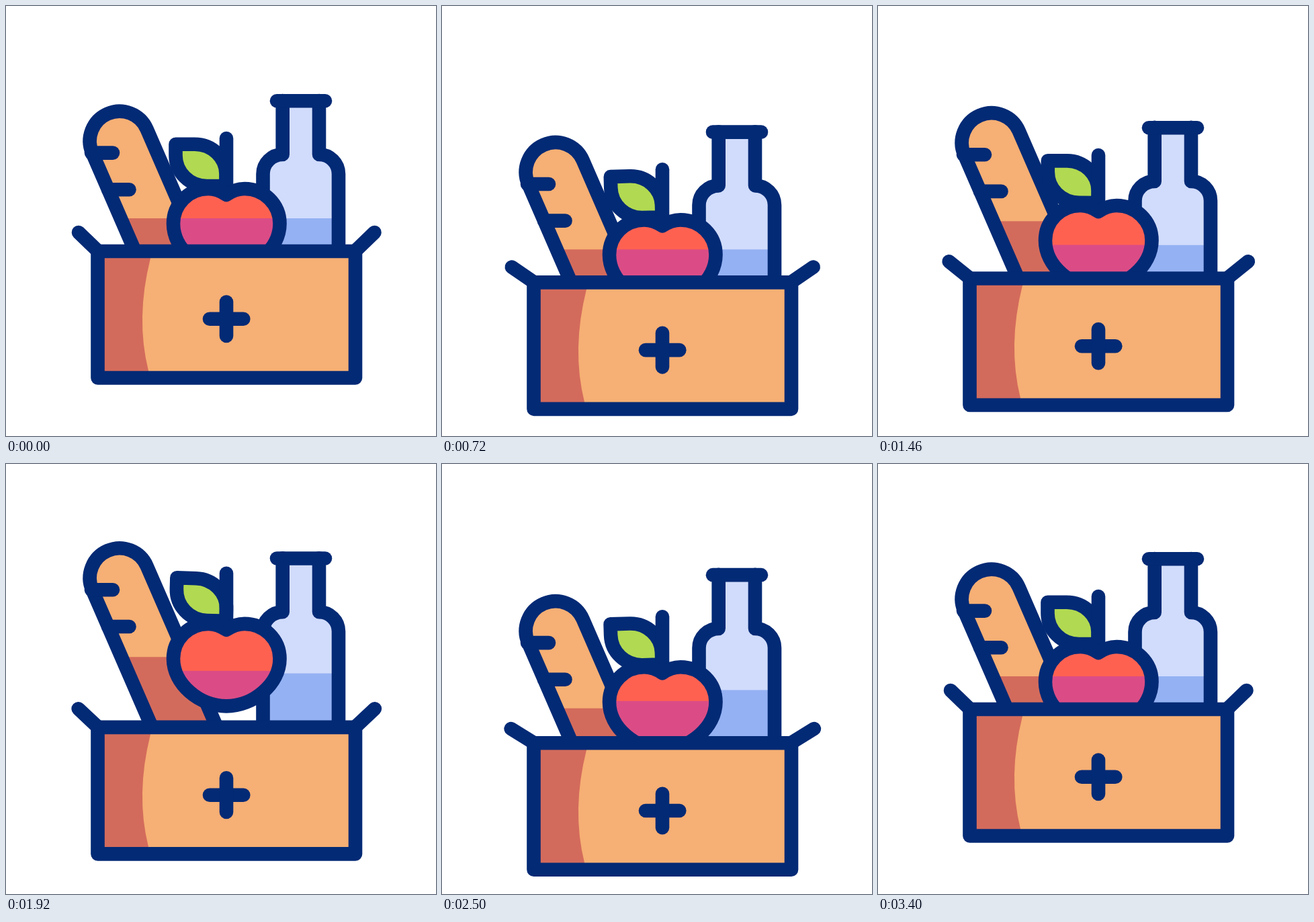
Animation of 640 by 640 pixels, one loop 3.62 s. Source, as an HTML page with a canvas:

```html
<!DOCTYPE html>
<html lang="en">
<head>
<meta charset="utf-8">
<title>Food box</title>
<style>
  html, body { margin: 0; width: 100%; height: 100%; overflow: hidden; background: #fff; }
  canvas { display: block; width: 100vw; height: 100vh; }
</style>
</head>
<body>
<canvas id="stage" width="640" height="640"></canvas>
<script>
const ctx = document.getElementById('stage').getContext('2d');
const LOOP = 3620, STEP = 20, LINE = 20.6, MID = 328.25;
const C = {
  ink: '#032a75', crust: '#f6af74', brown: '#d36b5c', red: '#ff6151', pink: '#db4c86',
  green: '#b1d951', glass: '#d1dcfc', water: '#94b1f3'
};

// Value at time t along [time, value] keys, eased in and out.
function track(t, keys) {
  if (t <= keys[0][0]) return keys[0][1];
  for (let i = 1; i < keys.length; i++) {
    const [t0, v0] = keys[i - 1], [t1, v1] = keys[i];
    if (t < t1) {
      const x = (t - t0) / (t1 - t0);
      return v0 + (v1 - v0) * x * x * (3 - 2 * x);
    }
  }
  return keys[keys.length - 1][1];
}

const beat = (t, a, b, c) => track(t, [[200, 0], [1000, a], [1800, b], [2600, c], [3400, 0]]);
const hop = (t, start, height) =>
  track(t, [[start, 0], [start + 800, -height], [start + 1600, 0]]);

const shapes = {
  bread: new Path2D(),
  bottle: new Path2D('M411.7 141V221A29.2 29 0 0 0 382.5 250V450H495V250A29 29 0 0 0 466 221V141'),
  apple: new Path2D('M328 281C320 275.5 311 272 301 272C272 272 249 295 249 324' +
    'C249 362 288 394.5 328 394.5C368 394.5 407.5 362 407.5 324' +
    'C407.5 295 384 272 355 272C345 272 336 275.5 328 281Z'),
  leaf: new Path2D('M252.5 205.7H281C307 205.7 327.5 226 327.5 250V268H299' +
    'C273 268 252.5 247.5 252.5 222Z'),
  shade: new Path2D('M136.5 365H217.5L215 375.5Q192.5 465 212 543L214 553.5H136.5Z')
};

// Slanted loaf: a half circle with two long parallel sides.
(function () {
  const tilt = -0.41, r = 44.3, len = 290;
  const dx = -Math.sin(tilt) * len, dy = Math.cos(tilt) * len;
  const nx = Math.cos(tilt) * r, ny = Math.sin(tilt) * r;
  const p = shapes.bread;
  p.moveTo(169 - nx + dx, 201 - ny + dy);
  p.lineTo(169 - nx, 201 - ny);
  p.arc(169, 201, r, Math.PI + tilt, 2 * Math.PI + tilt);
  p.lineTo(169 + nx + dx, 201 + ny + dy);
})();

function line(x0, y0, x1, y1) {
  ctx.beginPath();
  ctx.moveTo(x0, y0);
  ctx.lineTo(x1, y1);
  ctx.stroke();
}

function twoTone(path, top, bottom, level) {
  ctx.fillStyle = top;
  ctx.fill(path);
  ctx.save();
  ctx.clip(path);
  ctx.fillStyle = bottom;
  ctx.fillRect(0, level, 640, 640);
  ctx.restore();
  ctx.stroke(path);
}

function at(y, draw) {
  ctx.save();
  ctx.translate(0, y);
  draw();
  ctx.restore();
}

function drawBottle(jump) {
  twoTone(shapes.bottle, C.glass, C.water, 316 + jump * 0.13);
  line(403, 141.3, 475, 141.3);
}

function drawBread(jump) {
  twoTone(shapes.bread, C.crust, C.brown, 316 - jump * 0.045);
  line(127, 218.6, 159, 218.6);
  line(152, 273.3, 183.5, 273.3);
}

function drawApple(drop, turn) {
  ctx.save();
  ctx.translate(327.5, 268);
  ctx.rotate(turn);
  ctx.translate(-327.5, -268);
  ctx.fillStyle = C.green;
  ctx.fill(shapes.leaf);
  ctx.stroke(shapes.leaf);
  ctx.restore();
  line(328, 197, 328, 281);
  twoTone(shapes.apple, C.red, C.pink, 316 + drop);
}

function drawBox(angle) {
  const a = angle * Math.PI / 180;
  const fx = 40.3 * Math.cos(a), fy = 40.3 * Math.sin(a);
  line(137, 365, 137 - fx, 365 - fy);
  line(2 * MID - 137, 365, 2 * MID - 137 + fx, 365 - fy);
  ctx.fillStyle = C.crust;
  ctx.fillRect(136.5, 365, 383.5, 188.5);
  ctx.fillStyle = C.brown;
  ctx.fill(shapes.shade);
  ctx.strokeRect(136.5, 365, 383.5, 188.5);
  line(303, 465.8, 353.3, 465.8);
  line(328, 440.5, 328, 491);
}

function render(t) {
  const box = beat(t, 64.5, 25.3, 51.3);
  const bread = hop(t, 1000, 62);
  const apple = hop(t, 1200, 62.8);
  const bottle = hop(t, 1400, 38.5);
  const drop = track(t, [[1200, 0], [1680, 26], [1960, 26], [2760, 0]]);

  ctx.fillStyle = '#fff';
  ctx.fillRect(0, 0, 640, 640);
  ctx.strokeStyle = C.ink;
  ctx.lineWidth = LINE;
  ctx.lineCap = ctx.lineJoin = 'round';

  at(box + bottle, () => drawBottle(bottle));
  at(box + bread, () => drawBread(bread));
  at(box + apple, () => drawApple(drop, beat(t, -0.038, 0.034, -0.034)));
  at(box, () => drawBox(44 + beat(t, -13.3, 0, -13)));
}

const start = performance.now();
function tick() {
  const t = Math.max(0, performance.now() - start) % LOOP;
  render(Math.floor(t / STEP) * STEP);
  requestAnimationFrame(tick);
}
tick();
</script>
</body>
</html>
```
